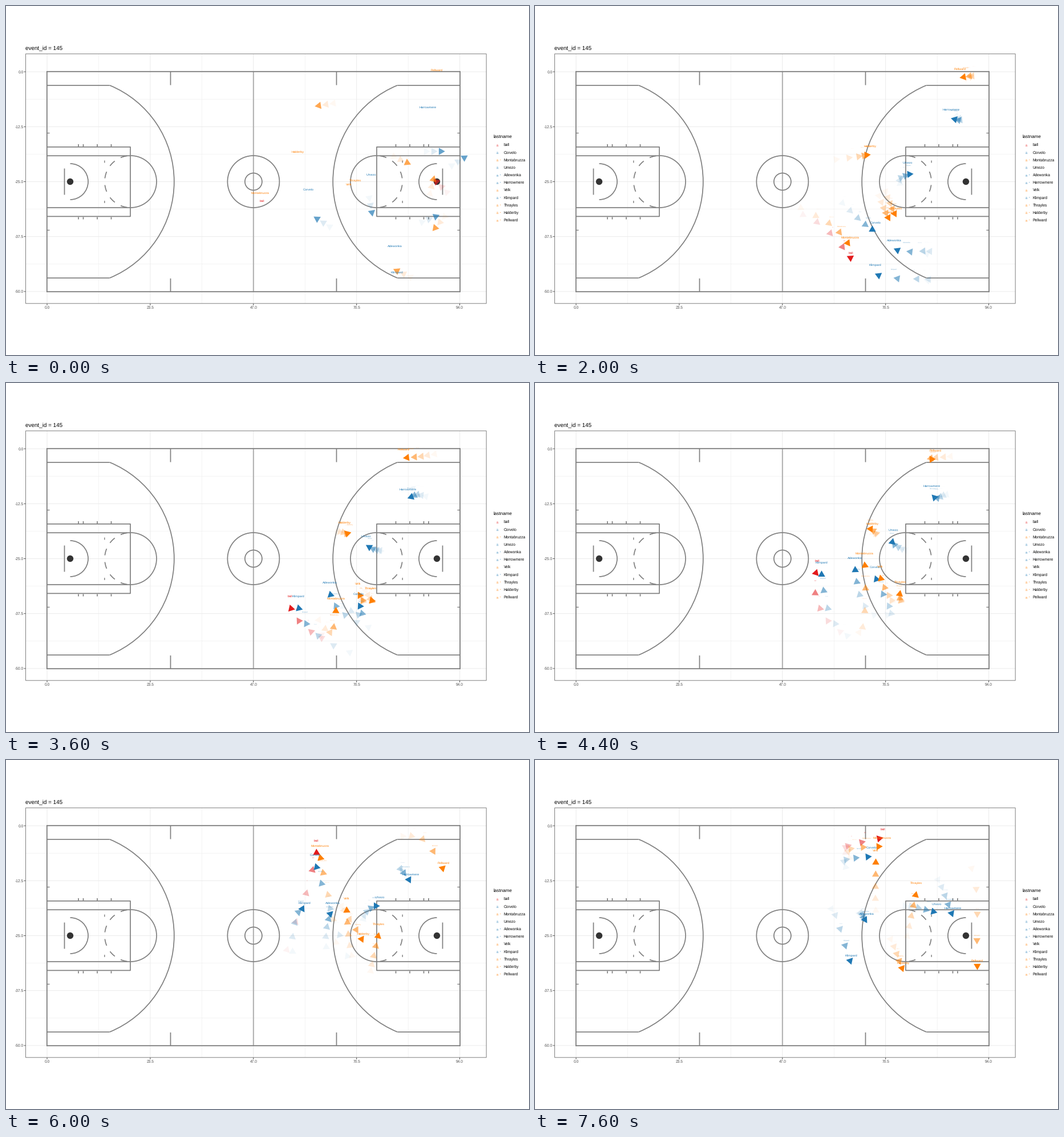
Write a matplotlib script that moves like this. It is 917 px wide and 611 px high and loops after 8 s.

```python
import numpy as np
import matplotlib.pyplot as plt
from matplotlib.animation import FuncAnimation
from matplotlib.patches import Arc, Circle, Polygon, Rectangle

W, H, DPI = 917, 611, 100
FRAMES, INTERVAL = 20, 400
PT = 72 / DPI
RED, BLUE, ORANGE = "#e31a1c", "#1f78b4", "#ff7f00"
GREY = "#7f7f7f"
MID_Y, MIRROR = 307, 867

plt.rcParams.update({"font.family": "Liberation Sans", "text.hinting": "none",
                     "path.snap": False})
fig = plt.figure(figsize=(W / DPI, H / DPI), dpi=DPI, facecolor="white")
ax = fig.add_axes([0, 0, 1, 1])
# Whole coordinates fall on pixel centres.
ax.set(xlim=(-0.5, W - 0.5), ylim=(H - 0.5, -0.5))
ax.axis("off")


def line(xs, ys, color=GREY, width=1.7, **kw):
    ax.plot(xs, ys, color=color, lw=width * PT, solid_capstyle="butt", **kw)


def text(x, y, s, px, color="black", ha="left", **kw):
    """Text whose capitals are centred on y."""
    return ax.text(x, y + 0.36 * px, s, fontsize=px * PT, color=color,
                   ha=ha, va="baseline", **kw)


def draw_panel():
    for k in range(4):
        x, y = 162 + 180.9 * k, 162.7 + 96.2 * k
        line([x, x], [83.5, 520.5], "#ebebeb", 0.5)
        line([34, 842], [y, y], "#ebebeb", 0.5)
    for k in range(5):
        x, y = 71.5 + 180.9 * k, 114.6 + 96.2 * k
        line([x, x], [83.5, 520.5], "#ebebeb", 1)
        line([34, 842], [y, y], "#ebebeb", 1)
        line([x, x], [520.5, 523.5], "#333333", 0.9)
        line([31, 34], [y, y], "#333333", 0.9)
        text(x, 527.5, f"{23.5 * k:.1f}", 6.7, "#4d4d4d", "center")
        text(30, y, f"{-12.5 * k:.1f}" if k else "0.0", 6.7, "#4d4d4d", "right")
    ax.add_patch(Rectangle((34, 83.3), 807.7, 437, fill=False, ec=GREY,
                           lw=PT, zorder=3))
    text(34, 73, "event_id = 145", 9.9)


def arc(cx, r, start, end, **kw):
    ax.add_patch(Arc((cx, MID_Y), 2 * r, 2 * r, theta1=start, theta2=end,
                     ec=GREY, lw=1.7 * PT, zorder=2, **kw))


def draw_half(right):
    def fx(*xs):
        return [MIRROR - x if right else x for x in xs]

    def half_arc(x, r, spread, facing=0, **kw):
        turn = facing + (180 if right else 0)
        arc(fx(x)[0], r, turn - spread, turn + spread, **kw)

    for y in (138.5, 475.7):
        line(fx(71, 181), [y, y])
    for y in (261.7, 352.5):
        line(fx(71, 217.5), [y, y])
    line(fx(71, 217.5, 217.5, 71), [246.3, 246.3, 367.9, 367.9])
    for y in (222, 392):
        line(fx(71, 76), [y, y], width=1.4)
    for x in (126.5, 135, 159.5, 184):
        line(fx(x, x), [241.5, 245.5])
        line(fx(x, x), [369, 373])
    for top, bottom in ((114, 138), (476.5, 500)):
        line(fx(288, 288), [top, bottom])
    for top, bottom in ((270, 274), (340.5, 344.5)):
        line(fx(172.3, 172.3), [top, bottom], width=1.4)
    line(fx(102, 102), [284, 330])
    half_arc(112, 182.3, 67.7)
    half_arc(112, 31.5, 90)
    half_arc(218, 45.5, 90)
    half_arc(218, 45.5, 90, facing=180, linestyle=(10.5, (7, 7)))
    ax.add_patch(Circle((fx(112)[0], MID_Y), 5.7, fc="#333333", ec="none", zorder=3))


def draw_court():
    line([433.4, 433.4], [114.3, 499.7], "#b5b5b5", 2.2)
    ax.add_patch(Rectangle((71.3, 114.3), 724.3, 385.4, fill=False, ec=GREY,
                           lw=1.8 * PT, zorder=2))
    for r in (45.5, 15):
        arc(433.4, r, 0, 360)
    draw_half(False)
    draw_half(True)


def glide(waypoints):
    """Smooth run through (frame, x, y) waypoints, one position per frame."""
    way = np.array(waypoints, float)
    t, p = way[:, 0], way[:, 1:]
    slope = np.gradient(p, t, axis=0)
    frames = np.arange(FRAMES)
    k = np.clip(np.searchsorted(t, frames, "right") - 1, 0, len(t) - 2)
    span = (t[k + 1] - t[k])[:, None]
    s = (frames - t[k])[:, None] / span
    ease = s * s * (3 - 2 * s)
    return (p[k] + ease * (p[k + 1] - p[k])
            + span * s * (1 - s) * ((1 - s) * slope[k] - s * slope[k + 1]))


TAIL_SPEED = 13


class Mover:
    def __init__(self, name, color, tail, *waypoints):
        self.name, self.color = name, color
        self.path = glide(waypoints)
        steps = np.diff(self.path, axis=0)
        self.steps = np.vstack([steps, steps[-1]])
        # Where the prior play left off: x, y and heading in degrees.
        x, y, degrees = tail
        self.tail = np.array([x, y])
        turn = np.radians(degrees)
        self.tail_step = TAIL_SPEED * np.array([np.cos(turn), np.sin(turn)])

    def at(self, frame):
        """Centre and unit heading; negative frames belong to the prior play."""
        if frame >= 0:
            pos, step = self.path[frame], self.steps[frame]
        else:
            held = max(0, -frame - 2)
            pos, step = self.tail - held * self.tail_step, self.tail_step
        return pos, step / max(np.hypot(*step), 1e-6)


movers = [
    Mover("ball", RED, (754, 307, 225),
          (0, 443, 353), (2, 494, 378), (6, 553, 446), (8, 513, 416), (11, 492, 332),
          (13, 526, 233), (15, 544, 162), (17, 548, 150), (19, 603, 137)),
    Mover("Corvelo", BLUE, (762, 254, 0),
          (0, 525, 332), (5, 591, 391), (8, 624, 403), (11, 598, 343),
          (15, 544, 187), (17, 545, 174), (19, 583, 169)),
    Mover("Montabruzza", ORANGE, (548, 174, 171),
          (0, 439, 339), (3, 515, 380), (8, 574, 427), (11, 578, 319),
          (15, 551, 171), (17, 553, 155), (19, 602, 151)),
    Mover("Umezo", BLUE, (803, 265, -32),
          (0, 640, 316), (3, 641, 300), (5, 656, 294), (8, 643, 290),
          (11, 626, 278), (15, 648, 255), (19, 698, 265)),
    Mover("Adewonka", BLUE, (641, 361, 80),
          (0, 676, 438), (2, 692, 429), (5, 635, 427), (8, 578, 390),
          (11, 561, 327), (15, 568, 269), (19, 578, 279)),
    Mover("Harrowmere", BLUE, (545, 372, 212),
          (0, 734, 188), (3, 745, 199), (7, 721, 195), (11, 700, 200),
          (13, 691, 190), (15, 706, 209), (19, 730, 268)),
    Mover("Velk", ORANGE, (703, 274, 25),
          (0, 598, 321), (4, 615, 362), (8, 625, 380), (11, 606, 342),
          (15, 597, 263), (19, 597, 179)),
    Mover("Klimpard", BLUE, (753, 368, -22),
          (0, 679, 482), (2, 690, 478), (5, 602, 471), (8, 526, 421),
          (11, 502, 335), (15, 519, 260), (19, 552, 351)),
    Mover("Thrayles", ORANGE, (749, 303, -76),
          (0, 610, 314), (5, 630, 363), (8, 641, 381), (11, 639, 369),
          (15, 652, 308), (19, 667, 236)),
    Mover("Halderby", ORANGE, (752, 388, 130),
          (0, 505, 271), (3, 567, 263), (6, 585, 260), (9, 598, 263),
          (11, 588, 255), (15, 623, 313), (19, 643, 364)),
    Mover("Pellward", ORANGE, (685, 463, 205),
          (0, 749, 129), (3, 766, 122), (7, 728, 128), (11, 695, 133),
          (13, 730, 138), (15, 765, 189), (19, 775, 360)),
]


def draw_legend():
    text(854, 228, "lastname", 8.1)
    for k, m in enumerate(movers):
        y = 242.5 + 13.15 * k
        text(861, y, "a", 5.5, m.color, "center", alpha=0.7)
        line([859.5, 863], [y + 2.3, y + 2.3], m.color, 0.8, alpha=0.5)
        if len(m.name) > 7:
            line([865.5, 867], [y, y], m.color, 0.9, alpha=0.6)
        text(872, y, m.name, 6.7)


WAKE_ALPHA = [1, 0.55, 0.3, 0.15, 0.05]
WAKE_SIZE = [1, 0.5, 0.28, 0.2, 0.2]
LABEL_PX, LABEL_RISE = 5.5, 15.5
TIP, RADIUS = 6.4, 7.2
CORNERS = np.radians([0, 120, 240])
moving = []


def draw_mover(m, frame, age):
    pos, heading = m.at(frame)
    alpha = WAKE_ALPHA[age]
    # The play opens with labels only, as nobody has moved yet.
    if frame != 0:
        angles = np.arctan2(heading[1], heading[0]) + CORNERS
        corners = pos + RADIUS * np.column_stack([np.cos(angles), np.sin(angles)])
        moving.append(ax.add_patch(Polygon(corners, fc=m.color, ec="none",
                                           alpha=alpha, zorder=5)))
    if frame >= 0:
        x, y = pos + TIP * heading
        moving.append(text(x, y - LABEL_RISE, m.name, LABEL_PX * WAKE_SIZE[age],
                           m.color, "center", alpha=alpha, zorder=6))


def update(i):
    while moving:
        moving.pop().remove()
    for age in reversed(range(len(WAKE_ALPHA))):
        for m in movers:
            draw_mover(m, i - age, age)
    return moving


draw_panel()
draw_court()
draw_legend()
anim = FuncAnimation(fig, update, frames=FRAMES, interval=INTERVAL,
                     init_func=lambda: [], repeat=True, repeat_delay=0, blit=False)
plt.show()
```
